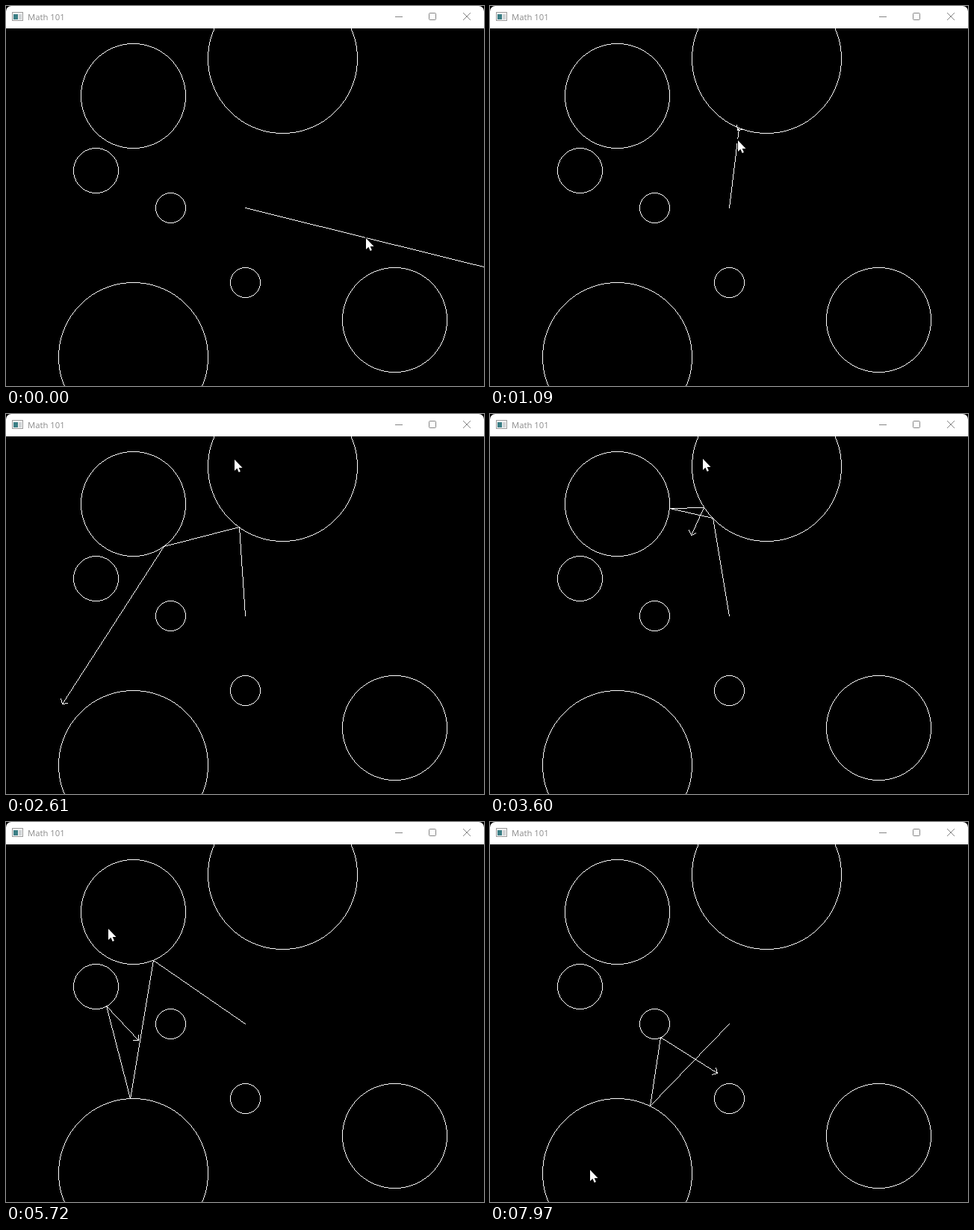
Recreate the animation shown at these times as an HTML page with a canvas. Size 640 px wide and 509 px high, loop 8000 ms.

```html
<!DOCTYPE html>
<html lang="en">
<head>
<meta charset="utf-8">
<title>Math 101</title>
<style>
  html, body { margin: 0; width: 100%; height: 100%; overflow: hidden; background: #000; }
  canvas, svg { position: absolute; left: 0; top: 0; display: block; }
  svg { border-radius: 7px 7px 0 0; }
  text { font: 11.3px "Open Sans", "Noto Sans", sans-serif; fill: #8c8c8c; }
</style>
</head>
<body>
<canvas id="stage" width="640" height="509"></canvas>
<svg width="640" height="30">
  <rect width="640" height="30" fill="#fff"/>
  <g shape-rendering="crispEdges">
    <rect x="8.5" y="8.5" width="14" height="11" fill="#f4f4f4" stroke="#9c9c9c"/>
    <rect x="10" y="11" width="6" height="7" fill="#3c7f86"/>
    <rect x="17" y="11" width="4" height="7" fill="#d0d4d6"/>
  </g>
  <text x="29" y="18.6">Math 101</text>
  <g fill="none" stroke="#858585">
    <path d="M521 14.5h10M612 9l10 10M622 9l-10 10"/>
    <rect x="566.5" y="9.5" width="9" height="9" rx="1"/>
  </g>
</svg>
<script>
const LOOP = 8000;
const PULSE = 2829;
const SHORTEST_AT = 1493;
const ORIGIN = { x: 320, y: 270 };
const CIRCLES = [
  { x: 170, y: 120, r: 70 }, { x: 370, y: 70, r: 100 }, { x: 120, y: 220, r: 30 },
  { x: 220, y: 270, r: 20 }, { x: 320, y: 370, r: 20 }, { x: 170, y: 470, r: 100 },
  { x: 520, y: 420, r: 70 }
];

// The pointer rests at each spot until the next move begins.
const POINTER_START = { x: 481, y: 310 };
const MOVES = [
  { begin: 0, end: 1090, x: 331, y: 179 },
  { begin: 1090, end: 2000, x: 305, y: 60 },
  { begin: 2900, end: 3600, x: 284, y: 59 },
  { begin: 4070, end: 4740, x: 154, y: 140 },
  { begin: 4870, end: 5720, x: 136, y: 142 },
  { begin: 6580, end: 7500, x: 133, y: 465 }
];

const ctx = document.getElementById("stage").getContext("2d");

const along = (p, d, dist) => ({ x: p.x + d.x * dist, y: p.y + d.y * dist });
const dot = (a, b) => a.x * b.x + a.y * b.y;
const unit = angle => ({ x: Math.cos(angle), y: Math.sin(angle) });
const plot = (x, y) => ctx.fillRect(x, y, 1, 1);

function pointerAt(t) {
  let { x, y } = POINTER_START;
  for (const move of MOVES) {
    const u = Math.min(1, Math.max(0, (t - move.begin) / (move.end - move.begin)));
    const eased = u * u * (3 - 2 * u);
    x += (move.x - x) * eased;
    y += (move.y - y) * eased;
  }
  return { x, y };
}

const rayLength = t => 272 - 256 * Math.cos(2 * Math.PI * (t - SHORTEST_AT) / PULSE);

function pixelLine(from, to) {
  const x = Math.round(from.x), y = Math.round(from.y);
  const dx = Math.round(to.x) - x, dy = Math.round(to.y) - y;
  const n = Math.max(Math.abs(dx), Math.abs(dy), 1);
  for (let i = 0; i <= n; i++) {
    plot(Math.round(x + dx * i / n), Math.round(y + dy * i / n));
  }
}

function pixelCircle({ x, y, r }) {
  for (let a = 0; a <= r * Math.SQRT1_2 + 0.5; a++) {
    const b = Math.round(Math.sqrt(r * r - a * a));
    for (const sx of [-1, 1]) {
      for (const sy of [-1, 1]) {
        plot(x + sx * a, y + sy * b);
        plot(x + sx * b, y + sy * a);
      }
    }
  }
}

function nearestHit(p, d) {
  let best = { dist: Infinity };
  for (const circle of CIRCLES) {
    const offset = along(p, circle, -1);
    const b = dot(offset, d);
    const disc = b * b - dot(offset, offset) + circle.r ** 2;
    if (b >= 0 || disc < 0) continue;
    const dist = -b - Math.sqrt(disc);
    if (dist > 1e-6 && dist < best.dist) best = { dist, circle };
  }
  return best;
}

function reflect(d, p, circle) {
  const normal = along(p, circle, -1);
  return along(d, normal, -2 * dot(d, normal) / circle.r ** 2);
}

function drawRay(aim, length) {
  let p = ORIGIN;
  let d = unit(Math.atan2(aim.y - p.y, aim.x - p.x));
  while (length > 0) {
    const { dist, circle } = nearestHit(p, d);
    const tip = along(p, d, Math.min(dist, length));
    pixelLine(p, tip);
    p = tip;
    length -= dist;
    if (length > 0) d = reflect(d, p, circle);
  }
  const back = Math.atan2(-d.y, -d.x);
  for (const turn of [-Math.PI / 4, Math.PI / 4]) {
    pixelLine(p, along(p, unit(back + turn), 7));
  }
}

const arrow = new Path2D("M0 0V15L3.4 11.7L5.7 17L7.9 16L5.7 10.9H10.5Z");

function drawPointer({ x, y }) {
  ctx.save();
  ctx.translate(Math.round(x) + 1, Math.round(y) + 1);
  ctx.lineWidth = 2;
  ctx.stroke(arrow);
  ctx.fill(arrow);
  ctx.restore();
}

function draw(t) {
  ctx.fillStyle = "#000";
  ctx.fillRect(0, 0, 640, 509);
  ctx.fillStyle = "#fff";
  CIRCLES.forEach(pixelCircle);
  const pointer = pointerAt(t);
  drawRay(pointer, rayLength(t));
  drawPointer(pointer);
}

const start = performance.now();
function frame() {
  draw((performance.now() - start) % LOOP);
  requestAnimationFrame(frame);
}
frame();
</script>
</body>
</html>
```
